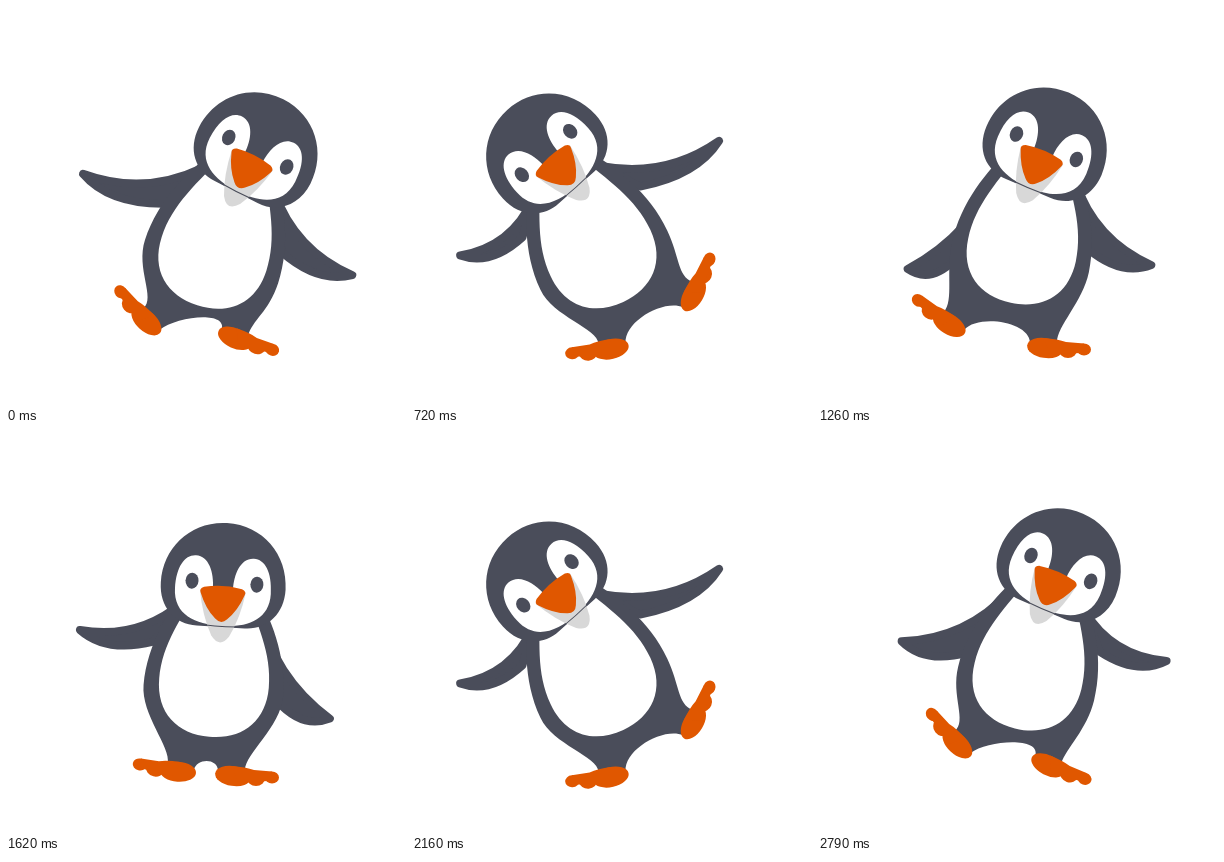
These frames come from a looping animation (400x400 px, 2880 ms). An HTML page with a canvas:

```html
<!DOCTYPE html>
<html lang="en">
<head>
<meta charset="utf-8">
<title>Waddling penguin</title>
<style>
  html, body { margin: 0; width: 100%; height: 100%; overflow: hidden; background: #fff; }
  canvas { display: block; width: 100%; height: 100%; }
</style>
</head>
<body>
<canvas id="stage" width="400" height="400"></canvas>
<script>
const ctx = document.getElementById('stage').getContext('2d');
const DARK = '#4a4d5a', ORANGE = '#e05700', GREY = '#d8d8d8', WHITE = '#fff';
const STEP = 90, LOOP = 2880, CYCLE = 16;
const RAD = Math.PI / 180;

// Each key is [phase, ...values]; a waddle lasts 16 steps.
const HEAD = [ // x, y, tilt
  [0, 251, 145, 27], [2, 217.5, 147, 3.5], [4, 191.5, 133, 0], [5, 180, 125, -8],
  [6, 163, 133, -22], [8, 134, 147, -42], [10, 165, 147, -8], [12, 194, 129, 0],
  [14, 228, 140, 23], [15, 242, 133, 23.4]
];
const BODY = [ // x, y, tilt
  [0, 208, 248, 18], [2, 208, 249, 5], [4, 194, 258, 0], [5, 192, 248, -6],
  [8, 188.5, 247, -25], [10, 190, 249, -6], [12, 200, 250, 0],
  [14, 204, 244, 12], [15, 210, 242, 14]
];
const LEFT_TIP = [
  [0, 73, 168], [2, 70, 197], [4, 73, 283], [5, 74, 235], [8, 45, 252],
  [10, 72, 286], [12, 62, 235], [14, 87, 266], [15, 80, 209]
];
const RIGHT_TIP = [
  [0, 349, 272], [2, 326, 288], [4, 311, 271], [5, 348, 215], [8, 311, 134],
  [10, 322, 197], [12, 349, 235], [14, 336, 262], [15, 352, 229]
];
const LEFT_FOOT = [ // heel x, heel y, toe lift
  [0, 141, 316, 51], [2, 173, 338, 13], [4, 198, 342, -6], [8, 200, 343, -4],
  [10, 199, 342, -4], [12, 172, 335, 12], [14, 132, 319, 40], [15, 140, 311, 52]
];
const RIGHT_FOOT = [
  [0, 228, 332, -15], [2, 226, 342, 0], [4, 252, 332, 15], [6, 275, 310, 50],
  [8, 281, 290, 68], [10, 246, 337, 13], [12, 226, 342, 0], [14, 226, 342, 0],
  [15, 229, 331, -18]
];

function sample(track, phase) {
  let i = track.length - 1;
  while (track[i][0] > phase) i--;
  const a = track[i], b = track[(i + 1) % track.length];
  const end = i + 1 < track.length ? b[0] : CYCLE;
  const k = (phase - a[0]) / (end - a[0]);
  return a.slice(1).map((v, j) => v + (b[j + 1] - v) * k);
}

function fill(color, draw) {
  ctx.beginPath();
  draw();
  ctx.fillStyle = color;
  ctx.fill();
}

function inFrame([x, y, tilt], draw) {
  ctx.save();
  ctx.translate(x, y);
  ctx.rotate(tilt * RAD);
  draw();
  ctx.restore();
}

function toWorld([ox, oy, tilt], x, y) {
  const c = Math.cos(tilt * RAD), s = Math.sin(tilt * RAD);
  return [ox + x * c - y * s, oy + x * s + y * c];
}

function toLocalY([ox, oy, tilt], x, y) {
  return (y - oy) * Math.cos(tilt * RAD) - (x - ox) * Math.sin(tilt * RAD);
}

function footPoint([fx, fy, lift], side, x, y) {
  const c = Math.cos(lift * RAD), s = Math.sin(lift * RAD);
  return [fx + side * (x * c + y * s), fy - x * s + y * c];
}

// Point between a and b, pushed toward the underside of a flipper.
function bulge(a, b, k, amount, side) {
  const dx = b[0] - a[0], dy = b[1] - a[1], len = Math.hypot(dx, dy);
  return [a[0] + dx * k - side * dy / len * amount, a[1] + dy * k + side * dx / len * amount];
}

function drawFlipper(body, tip, side) {
  const top = toWorld(body, side * 38, -78);
  const low = toWorld(body, side * 64, toLocalY(body, ...tip) * 0.7 - 8);
  const dx = top[0] - tip[0], dy = top[1] - tip[1], len = Math.hypot(dx, dy);
  const end = [tip[0] + dx / len * 4, tip[1] + dy / len * 4];
  ctx.strokeStyle = DARK;
  ctx.lineWidth = 8;
  ctx.lineJoin = 'round';
  fill(DARK, () => {
    ctx.moveTo(...top);
    ctx.quadraticCurveTo(...bulge(top, end, 0.5, 25, side), ...end);
    ctx.quadraticCurveTo(...bulge(low, end, 0.6, 19, side), ...low);
    ctx.closePath();
  });
  ctx.stroke();
}

function drawTorso(body, left, right) {
  const at = (x, y) => toWorld(body, x, y);
  const l = (x, y) => footPoint(left, -1, x, y);
  const r = (x, y) => footPoint(right, 1, x, y);
  const inL = l(-14, -5), inR = r(-14, -5);
  const arch = 8 + 0.2 * Math.hypot(inR[0] - inL[0], inR[1] - inL[1]);
  fill(DARK, () => {
    ctx.moveTo(...at(-34, -95));
    ctx.bezierCurveTo(...at(-50, -70), ...at(-70, -35), ...at(-70, 8));
    ctx.bezierCurveTo(...at(-70, 38), ...l(13, -22), ...l(13, -6));
    ctx.lineTo(...l(0, 0));
    ctx.lineTo(...inL);
    ctx.bezierCurveTo(...l(-14, -5 - arch), ...r(-14, -5 - arch), ...inR);
    ctx.lineTo(...r(0, 0));
    ctx.lineTo(...r(13, -6));
    ctx.bezierCurveTo(...r(13, -22), ...at(70, 38), ...at(70, 8));
    ctx.bezierCurveTo(...at(70, -35), ...at(50, -70), ...at(34, -95));
  });
}

function drawBelly(body) {
  inFrame(body, () => fill(WHITE, () => {
    ctx.moveTo(-20, -100);
    ctx.bezierCurveTo(-38, -62, -55, -35, -55, 0);
    ctx.bezierCurveTo(-55, 35, -32, 54, 0, 54);
    ctx.bezierCurveTo(32, 54, 55, 35, 55, 0);
    ctx.bezierCurveTo(55, -35, 38, -62, 20, -100);
  }));
}

function drawFoot([x, y, lift], side) {
  ctx.save();
  ctx.translate(x, y);
  ctx.scale(side, 1);
  ctx.rotate(-lift * RAD);
  fill(ORANGE, () => ctx.ellipse(1, 0, 18, 10, 0.16, 0, 7));
  fill(ORANGE, () => ctx.ellipse(24, 2.5, 9, 7.5, 0, 0, 7));
  fill(ORANGE, () => ctx.ellipse(40, 1.5, 7, 6, 0, 0, 7));
  fill(ORANGE, () => {
    ctx.moveTo(0, -10);
    ctx.quadraticCurveTo(14, -9, 22, -6);
    ctx.lineTo(40, -4.5);
    ctx.lineTo(38, 5);
    ctx.lineTo(6, 6);
  });
  ctx.restore();
}

function drawHead(head, drift) {
  inFrame(head, () => {
    fill(DARK, () => {
      ctx.moveTo(0, -58);
      ctx.bezierCurveTo(36, -58, 62.5, -30, 62.5, 5);
      ctx.bezierCurveTo(62.5, 30, 46, 46, 24, 46);
      ctx.lineTo(-24, 46);
      ctx.bezierCurveTo(-46, 46, -62.5, 30, -62.5, 5);
      ctx.bezierCurveTo(-62.5, -30, -36, -58, 0, -58);
    });
    fill(WHITE, () => {
      ctx.moveTo(0, 45);
      for (const s of [-1, 1]) {
        if (s < 0) {
          ctx.bezierCurveTo(-25, 45, -48, 37, -48, 10);
          ctx.bezierCurveTo(-48, -12, -40, -24, -29, -24);
          ctx.bezierCurveTo(-16, -24, -10, -8, -10, 8);
          ctx.lineTo(-10, 20);
        } else {
          ctx.lineTo(10, 20);
          ctx.lineTo(10, 8);
          ctx.bezierCurveTo(10, -8, 16, -24, 29, -24);
          ctx.bezierCurveTo(40, -24, 48, -12, 48, 10);
          ctx.bezierCurveTo(48, 37, 25, 45, 0, 45);
        }
      }
    });
    fill(GREY, () => {
      ctx.moveTo(-23, 10);
      ctx.quadraticCurveTo(-19, 36, -9, 55);
      ctx.quadraticCurveTo(0, 68, 9, 55);
      ctx.quadraticCurveTo(19, 36, 23, 10);
    });
    ctx.beginPath();
    ctx.moveTo(-28, 44);
    ctx.quadraticCurveTo(0, 47, 28, 44);
    ctx.strokeStyle = DARK;
    ctx.lineWidth = 1;
    ctx.stroke();
    fill(ORANGE, () => {
      ctx.moveTo(-19, 7);
      ctx.quadraticCurveTo(0, 3, 19, 7);
      ctx.quadraticCurveTo(24, 9, 22, 13);
      ctx.quadraticCurveTo(16, 29, 6, 38);
      ctx.quadraticCurveTo(0, 44, -6, 38);
      ctx.quadraticCurveTo(-16, 29, -22, 13);
      ctx.quadraticCurveTo(-24, 9, -19, 7);
    });
  });
  inFrame([head[0] + 0.7 + 0.7 * drift, head[1] + 1.2 + 1.2 * drift, head[2]], () => {
    for (const s of [-1, 1]) fill(DARK, () => ctx.ellipse(s * 32.5, 0, 6.5, 8, 0, 0, 7));
  });
}

function render(now) {
  const step = Math.floor((now % LOOP) / STEP);
  const phase = step % CYCLE;
  const body = sample(BODY, phase);
  const left = sample(LEFT_FOOT, phase), right = sample(RIGHT_FOOT, phase);
  ctx.fillStyle = WHITE;
  ctx.fillRect(0, 0, 400, 400);
  drawFlipper(body, sample(LEFT_TIP, phase), -1);
  drawFlipper(body, sample(RIGHT_TIP, phase), 1);
  drawTorso(body, left, right);
  drawBelly(body);
  drawFoot(left, -1);
  drawFoot(right, 1);
  drawHead(sample(HEAD, phase), -Math.sin(step / 32 * 2 * Math.PI));
}

let start;
function tick() {
  const now = performance.now();
  if (start === undefined) start = now;
  render(now - start);
  requestAnimationFrame(tick);
}
tick();
</script>
</body>
</html>
```
